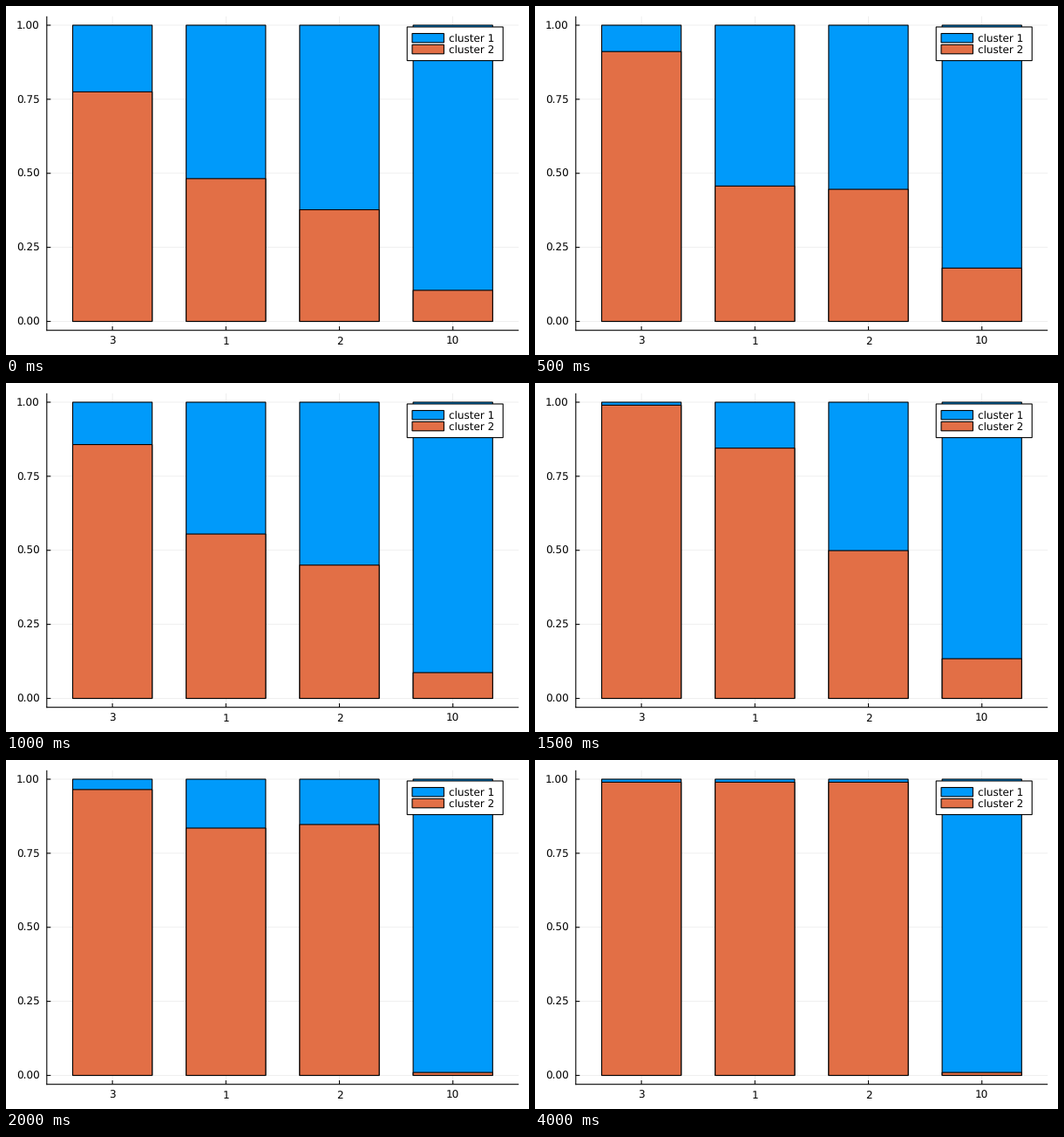
Write a matplotlib script that moves like this. It is 600 by 400 pixels and loops after 5000 ms.

```python
import matplotlib.pyplot as plt
from matplotlib.animation import FuncAnimation
from matplotlib.patches import Rectangle

W, H, DPI = 600, 400, 100
PX = 72 / DPI  # points per pixel
BLUE, ORANGE = "#009AFA", "#E26F46"
LEFT, RIGHT, TOP, BOTTOM = 46.8, 588.2, 11.8, 371.7
ZERO, ONE = 361.5, 22.0
BAR_WIDTH = 91.2
CENTERS = [122.1 + 130.2 * i for i in range(4)]
LABELS = ["3", "1", "2", "10"]

# Share of cluster 2 in each bar, one row per step.
SHARES = [
    (0.775, 0.482, 0.377, 0.105),
    (0.911, 0.457, 0.446, 0.180),
    (0.857, 0.555, 0.450, 0.087),
    (0.990, 0.845, 0.499, 0.134),
    (0.965, 0.835, 0.847, 0.010),
    (0.990, 0.990, 0.990, 0.010),
]

plt.rcParams.update({"font.family": "DejaVu Sans", "text.hinting": "none"})
fig = plt.figure(figsize=(W / DPI, H / DPI), dpi=DPI, facecolor="white")
ax = fig.add_axes([0, 0, 1, 1])
ax.set(xlim=(0, W), ylim=(H, 0))
ax.axis("off")


def y_of(value):
    return ZERO + (ONE - ZERO) * value


def line(x0, y0, x1, y1, width=1.1, color="black", z=1):
    ax.plot([x0, x1], [y0, y1], color=color, lw=width * PX, zorder=z,
            solid_capstyle="butt", snap=False)


def box(x0, y0, x1, y1, color, z):
    patch = Rectangle((x0, y0), x1 - x0, y1 - y0, facecolor=color,
                      edgecolor="black", lw=1.1 * PX, zorder=z, snap=False)
    return ax.add_patch(patch)


def label(x, baseline, text, align):
    ax.text(x, baseline, text, size=12 * PX, ha=align, va="baseline", zorder=6)


def grid_line(*ends):
    line(*ends, width=0.6, color=(0, 0, 0, 0.1), z=0)


# Axes, grid and tick labels
for value in (0, 0.25, 0.5, 0.75, 1):
    y = y_of(value)
    grid_line(LEFT, y, RIGHT, y)
    line(LEFT, y, LEFT + 4.5, y)
    label(38.7, y + 4.5, f"{value:.2f}", "right")
for x, name in zip(CENTERS, LABELS):
    grid_line(x, TOP, x, BOTTOM)
    line(x, BOTTOM, x, BOTTOM - 4.5)
    label(x, 387.5, name, "center")
line(LEFT, TOP, LEFT, BOTTOM + 0.5)
line(LEFT - 0.5, BOTTOM, RIGHT, BOTTOM)

# Bars: a full blue column with the orange share in front
shares = []
for x in CENTERS:
    x0, x1 = x - BAR_WIDTH / 2, x + BAR_WIDTH / 2
    box(x0, ONE, x1, ZERO, BLUE, 2)
    shares.append(box(x0, ZERO, x1, ZERO, ORANGE, 3))

# Legend
box(460.2, 24, 570.2, 62.6, "white", 4)
for y, color, name in ((36.7, BLUE, "cluster 1"), (49.6, ORANGE, "cluster 2")):
    box(466, y - 5.2, 502.4, y + 5.2, color, 5)
    label(507.7, y + 4.4, name, "left")


def update(step):
    row = SHARES[min(step, len(SHARES) - 1)]
    for patch, value in zip(shares, row):
        patch.set_y(y_of(value))
        patch.set_height(ZERO - y_of(value))
    return shares


anim = FuncAnimation(fig, update, frames=10, interval=500, repeat=True,
                     repeat_delay=0)
plt.show()
```
